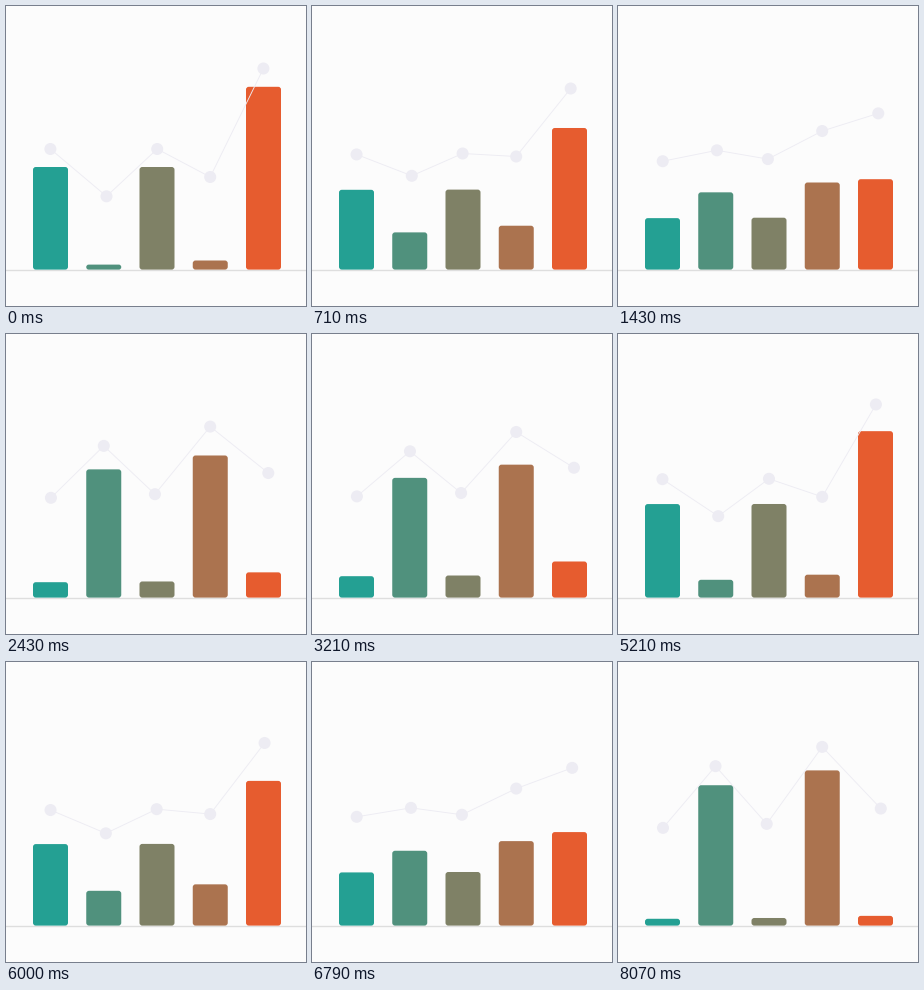
A matplotlib script that plays this animation: 300x300 px, repeating every 8210 ms.

```python
import numpy as np
import matplotlib.pyplot as plt
from matplotlib.animation import FuncAnimation
from matplotlib.patches import Circle, FancyBboxPatch

SIZE, DPI = 300, 100
PX = 72 / DPI
LOOP, FRAMES = 8210, 115
HALF = 113.5 / 3  # frames for one swing

BASE, WIDTH, RADIUS = 263.6, 35, 2.8
LEFT = 27 + 53.25 * np.arange(5)
COLORS = ["#24a093", "#50917d", "#7f8166", "#ab734f", "#e65c2f"]
PALE = "#edecf3"

# bar tops and dot centres at both ends of the swing
TOP_A = np.array([161, 258.6, 161, 254.5, 80.8])
TOP_B = np.array([257.3, 122.5, 256.5, 107.6, 254.8])
DOT_A = np.array([(44.4, 143), (100.5, 190.3), (151.2, 143), (204.2, 171), (257.4, 62.5)])
DOT_B = np.array([(45, 166), (97.5, 103.7), (148.7, 162), (204.2, 84.4), (262.8, 147)])

fig = plt.figure(figsize=(SIZE / DPI, SIZE / DPI), dpi=DPI, facecolor="#fcfcfc")
ax = fig.add_axes([0, 0, 1, 1])
ax.set(xlim=(0, SIZE), ylim=(SIZE, 0))
ax.axis("off")

ax.plot([0, SIZE], [264, 264], color="#dedede", lw=1.4 * PX, zorder=1)
bars = [
    ax.add_patch(FancyBboxPatch((x, BASE - 10), WIDTH, 10, fc=c, ec="none", lw=0, zorder=2,
                                boxstyle=f"round,pad=0,rounding_size={RADIUS}"))
    for x, c in zip(LEFT, COLORS)
]
line, = ax.plot([], [], color=PALE, lw=0.9 * PX, zorder=3)
dots = [ax.add_patch(Circle(p, 6, fc=PALE, ec="none", lw=0, zorder=4)) for p in DOT_A]


def swing(i):
    """Linear back and forth between 0 and 1, with a tiny rest at each end."""
    phase = (i / HALF) % 2
    return np.clip(1.012 * min(phase, 2 - phase) - 0.004, 0, 1)


def draw(i):
    p = swing(i)
    for bar, x, top in zip(bars, LEFT, TOP_A + (TOP_B - TOP_A) * p):
        height = BASE - top
        bar.set_bounds(x, top, WIDTH, height)
        bar.set_boxstyle("round", pad=0, rounding_size=min(RADIUS, height / 2))
    points = DOT_A + (DOT_B - DOT_A) * p
    line.set_data(points[:, 0], points[:, 1])
    for dot, point in zip(dots, points):
        dot.center = point
    return [*bars, line, *dots]


anim = FuncAnimation(fig, draw, frames=FRAMES, interval=LOOP / FRAMES,
                     repeat=True, repeat_delay=0, blit=False)
plt.show()
```
